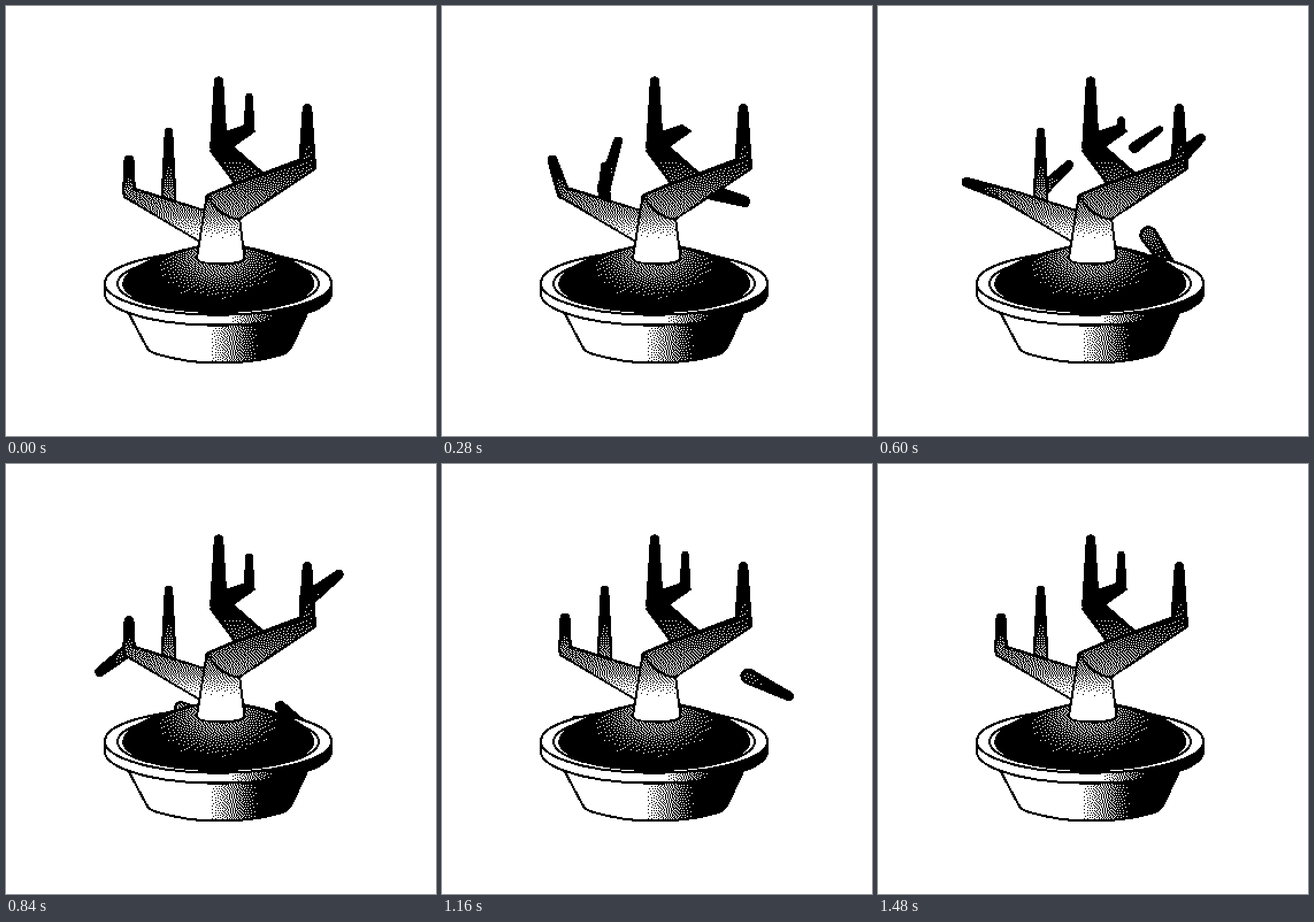
An HTML page with a canvas that plays this animation: 748 by 748 pixels, repeating every 1560 ms.

```html
<!DOCTYPE html>
<html lang="en">
<head>
<meta charset="utf-8">
<title>Bonsai</title>
<style>
html, body { margin: 0; width: 100%; height: 100%; overflow: hidden; background: #fff; }
canvas { display: block; width: 100vw; height: 100vh; image-rendering: pixelated; }
</style>
</head>
<body>
<canvas id="view" width="374" height="374"></canvas>
<script>
const SIZE = 374, STAGE = 748, LOOP = 1560, STEP = 40, END = 1480;
const GRAVITY = 0.0026, GROUND = 465;
const view = document.getElementById('view').getContext('2d');
const buffer = document.createElement('canvas');
buffer.width = buffer.height = SIZE;
const g = buffer.getContext('2d', { willReadFrequently: true });
g.scale(SIZE / STAGE, SIZE / STAGE);

// Red holds the tone to stipple; green is zero only where there is solid ink.
const tone = v => `rgb(${Math.round(v * 255)},255,255)`;
const blend = (grad, stops) => {
  stops.forEach(([at, v]) => grad.addColorStop(at, tone(v)));
  return grad;
};
const linear = (x0, y0, x1, y1, stops) => blend(g.createLinearGradient(x0, y0, x1, y1), stops);

const bark = linear(0, 255, 0, 405, [[0, 0], [.25, .14], [.5, .32], [.7, .46], [.86, .76], [1, 1]]);
const potShade = linear(350, 0, 440, 0, [[0, 1], [.5, .5], [1, 0]]);
const rimShade = linear(385, 0, 470, 0, [[0, 1], [.5, .45], [1, 0]]);

function ink(path, fill, line = path) {
  g.fillStyle = fill;
  g.fill(new Path2D(path));
  g.stroke(new Path2D(line));
}

function oval(cx, cy, rx, ry) {
  g.beginPath();
  g.ellipse(cx, cy, rx, ry, 0, 0, 7);
  g.fillStyle = '#fff';
  g.fill();
  g.stroke();
}

// Tapered stick with round ends, lighter towards its thick base.
function stick(x, y, deg, len, thick, thin, shade) {
  const a = deg * Math.PI / 180, q = Math.PI / 2;
  const tx = x + Math.cos(a) * len, ty = y + Math.sin(a) * len;
  g.beginPath();
  g.arc(tx, ty, thin - 2, a - q, a + q);
  g.arc(x, y, thick - 2, a + q, a + 3 * q);
  g.closePath();
  g.fillStyle = linear(x, y, tx, ty, [[0, shade], [.6, 0], [1, 0]]);
  g.fill();
  g.stroke();
}

// Each twig turns on its base from start to release, then falls spinning.
const falling = [
  { x: 435, y: 314, deg: -14, len: 95, thick: 16, thin: 10, shade: .25,
    start: 40, release: 345, turn: 38, spin: .125, vx: .14 },
  { x: 281, y: 318, deg: -90, len: 102, thick: 12, thin: 8, shade: .4,
    start: 40, release: 554, turn: 36, spin: .24, vx: .08, grow: -.065 },
  { x: 425, y: 212, deg: -90, len: 54, thick: 10, thin: 6.5, shade: 0,
    start: 360, release: 438, turn: 6, spin: .3, vx: .13 },
  { x: 211, y: 325, deg: -90, len: 60, thick: 12, thin: 9, shade: .3, ease: 1.6,
    start: 40, release: 850, turn: -130, spin: -.28, vx: .07 },
  { x: 523, y: 272, deg: -45, len: 36, thick: 14, thin: 8.5, shade: .12,
    start: 400, release: 840, turn: 7, spin: .2, vx: .03, rise: 36, grow: .08 }
];

function drawFalling(t) {
  for (const { x, y, deg, len, thick, thin, shade, start, release, turn, spin, vx,
    ease = 1, rise = 0, grow = 0 } of falling) {
    if (t < start) continue;
    const u = Math.min(1, (t - start) / (release - start));
    const s = Math.max(0, t - release);
    const by = y - rise * u ** 2 + GRAVITY * s * s / 2;
    if (by > GROUND) continue;
    const size = len + grow * (Math.min(t, release + 100) - start);
    stick(x + vx * s, by, deg + turn * u ** ease + spin * s, size, thick, thin, shade);
  }
}

function drawPot() {
  ink('M211 530 L244 592 Q249 602 264 606 Q315 621 369 621 Q430 621 478 607 Q491 603 497 592 L526 530 Z', potShade);
  ink('M172 482 V500 A197 55 0 0 0 566 500 V482 Z', rimShade);
  oval(369, 482, 197, 55);
  oval(369, 483, 175, 49);
  const mound = new Path2D('M204 483 C207 460 252 437 332 419 H414 C480 431 531 455 535 483 A165.5 47 0 0 1 204 483 Z');
  g.save();
  g.fillStyle = '#000';
  g.fill(mound);
  g.clip(mound);
  g.translate(367, 436);
  g.scale(1.5, 1);
  g.fillStyle = blend(g.createRadialGradient(0, 0, 0, 0, 0, 78), [[0, .48], [.35, .37], [.7, .14], [1, 0]]);
  g.fillRect(-130, -90, 260, 180);
  g.restore();
  g.stroke(mound);
}

function grown(t, from, to) {
  if (t < STEP || t >= to) return 1;
  return t <= from ? 0 : 1 - (1 - (t - from) / (to - from)) ** 1.5;
}

// New twig; its base lightens as it reaches full height.
function sprout(x, y, len, thick, thin, shade, k) {
  if (k > 0) stick(x, y, -90, len * k, thin + (thick - thin) * k, thin, shade * k ** 4);
}

function drawTree(t) {
  // back branch
  ink('M356 252 L402 314 L455 298 L396 246 Z', bark);
  ink('M372 223 L418 208 L432 218 L392 246 L366 250 Z', '#000');
  stick(370, 245, -90, 114, 15.5, 8.5, 0);
  sprout(423, 212, 54, 10, 6.5, 0, grown(t, 540, 900));

  // left branch
  sprout(283, 335, 116, 14, 7.5, .4, grown(t, 100, 600));
  sprout(214, 324, 56, 12, 9, .4, grown(t, 600, 900));
  ink('M221 317 L346 356 L334 408 L207 333 Z', bark, 'M221 317 L346 356 M334 408 L207 333 L205 326');

  // trunk
  ink('M349 331 L332 439 Q333 448 373 449 Q411 448 415 439 L406 368 Z', bark);

  // right branch
  stick(524, 273, -90, 95, 15.5, 8.5, .1);
  ink('M350 329 L385 314 L509 268 L538 272 L537 284 L407 370 Q372 370 350 329 Z', bark,
    'M509 268 L385 314 L350 329 Q372 370 407 370 L537 284 V272');
}

// Error diffusion of the tones; ink stays solid and clean-edged.
function stipple() {
  const img = g.getImageData(0, 0, SIZE, SIZE), d = img.data;
  const carry = new Float32Array(SIZE * SIZE + SIZE + 2);
  for (let i = 0; i < SIZE * SIZE; i++) {
    const p = i * 4, cover = d[p + 1];
    let out = 0;
    if (cover >= 128) {
      const v = d[p] * 255 / cover + carry[i];
      out = v < 128 ? 0 : 255;
      const e = (v - out) / 16;
      carry[i + 1] += e * 7;
      carry[i + SIZE - 1] += e * 3;
      carry[i + SIZE] += e * 5;
      carry[i + SIZE + 1] += e;
    }
    d[p] = d[p + 1] = d[p + 2] = out;
  }
  view.putImageData(img, 0, 0);
}

function draw(t) {
  g.fillStyle = '#fff';
  g.fillRect(0, 0, STAGE, STAGE);
  g.strokeStyle = '#000';
  g.lineWidth = 4;
  g.lineJoin = g.lineCap = 'round';
  if (t < END) drawFalling(t);
  drawPot();
  drawTree(t);
  stipple();
}

let shown = -1;
function tick(now) {
  const t = Math.floor((now % LOOP) / STEP) * STEP;
  if (t !== shown) draw(shown = t);
  requestAnimationFrame(tick);
}
draw(0);
requestAnimationFrame(tick);
</script>
</body>
</html>
```
